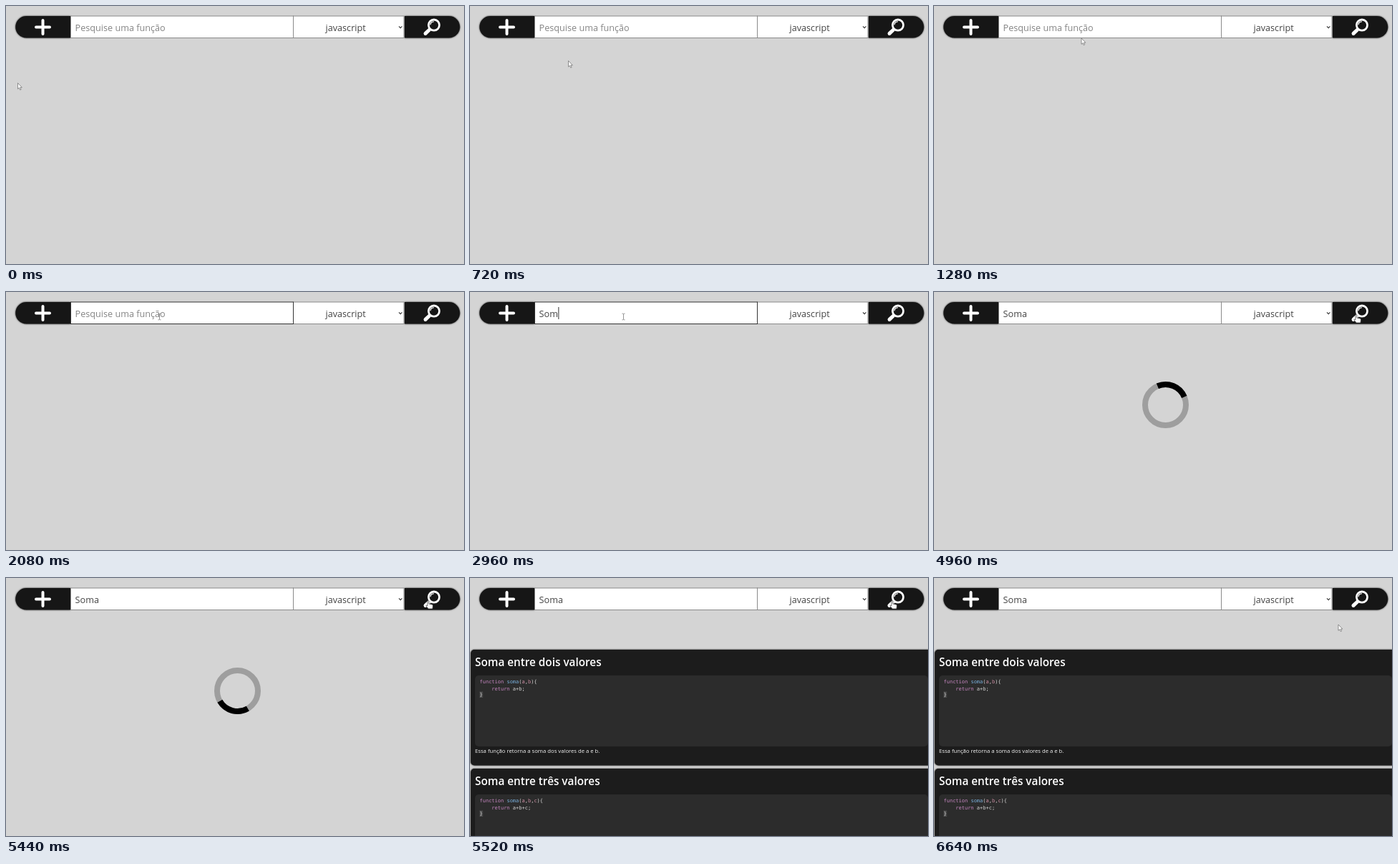
These frames come from a looping animation (640 by 360 pixels, 7.36 s). An HTML page:

```html
<!DOCTYPE html>
<html lang="pt">
<head>
<meta charset="utf-8">
<title>Busca de funções</title>
<style>
  html, body { margin: 0; width: 100%; height: 100%; overflow: hidden; background: #d4d4d4; }
  svg { display: block; width: 100vw; height: 100vh; }
  text { font-family: "Open Sans", "Noto Sans", sans-serif; white-space: pre; }
  .field { font-size: 12.65px; fill: #444; }
  .hint { fill: #858585; }
  .title { font-size: 15.3px; font-weight: 600; fill: #fff; }
  .note { font-size: 7.7px; fill: #f4f4f4; }
  .code { font-family: "DejaVu Sans Mono", monospace; font-size: 7px; fill: #d2d2d2; }
  .key { fill: #c586c0; }
  .name { fill: #79b0dc; }
  .arg { fill: #cf8fa4; }
  .line { fill: none; stroke: #fff; stroke-linecap: round; }
</style>
</head>
<body>
<svg viewBox="0 0 640 360" xmlns="http://www.w3.org/2000/svg">
  <defs>
    <filter id="glow" x="-20%" y="-40%" width="140%" height="180%">
      <feDropShadow dx="0" dy="0" stdDeviation="1.3" flood-color="#000" flood-opacity=".8"/>
    </filter>
  </defs>
  <rect width="640" height="360" fill="#d4d4d4"/>

  <g fill="#191919" filter="url(#glow)">
    <path d="M90 14H28.5a15.3 15.3 0 0 0 0 30.6H90z"/>
    <path d="M557 14h62a15.3 15.3 0 0 1 0 30.6h-62z"/>
  </g>
  <path class="line" d="M51.5 20v19M42 29.5h19" stroke-width="4"/>
  <g class="line">
    <circle cx="598" cy="26.6" r="7.6" stroke-width="2.8"/>
    <path d="M593 26a5 5 0 0 1 4.5 -4.2" stroke-width="1.2"/>
    <path d="M591.5 33.2l-5.4 5.2" stroke-width="5"/>
  </g>
  <rect x="401.5" y="14" width="154.5" height="30.5" fill="#fff" stroke="#8a8a8a"/>
  <rect id="input" x="90.5" y="14" width="311" height="30.5" fill="#fff"/>
  <text class="field" x="446.5" y="34.5">javascript</text>
  <path d="M549 28.4l2.2 2.2 2.2 -2.2" fill="none" stroke="#333" stroke-width="1.1"/>
  <text id="query" x="96.6" y="34.5"></text>
  <rect id="caret" y="21" width="1" height="17" fill="#333"/>

  <g id="spinner" fill="none" stroke-width="8">
    <circle cx="323.5" cy="157.5" r="28.5" stroke="#9e9e9e"/>
    <circle id="arc" cx="323.5" cy="157.5" r="28.5" stroke="#000" stroke-dasharray="44.77 134.3"/>
  </g>
  <g id="results"></g>

  <g id="cursor">
    <path id="arrow" d="M0 0V8.3L1.9 6.6 3.2 9.6 4.6 9 3.3 6.1H5.8z"
      fill="#fff" stroke="#666" stroke-width=".7" stroke-linejoin="round"/>
    <path id="beam" d="M-2 -4.3h1.4l.6 .5 .6 -.5H2M0 -3.8V3.8M-2 4.3h1.4l.6 -.5 .6 .5H2"
      fill="none" stroke="#888" stroke-width=".9"/>
    <path id="hand" d="M-1 1a1 1 0 0 1 2 0V4.5l4.4 1q1.4 .4 1.2 1.9L6 11.5H.2L-3.2 7.4q.3 -1.4 2.2 -.2z"
      fill="#fff" stroke="#333" stroke-width=".7" stroke-linejoin="round"/>
  </g>
</svg>
<script>
const LOOP = 7360, STEP = 80;
const $ = id => document.getElementById(id);
const show = (id, on) => $(id).setAttribute('display', on ? 'inline' : 'none');

// time, x, y of the pointer
const path = [
  [560, 16.5, 107.5], [640, 45, 98], [800, 230, 55], [960, 450, 24], [1040, 495, 20],
  [1120, 420, 27], [1200, 300, 39], [1280, 206, 45], [1360, 209, 41], [1520, 214.5, 34.5],
  [3680, 214.5, 34.5], [3760, 225, 36], [3920, 310, 62], [4080, 430, 85], [4160, 475, 87],
  [4320, 550, 72], [4480, 588, 53], [4640, 590, 41], [4800, 590, 31.5],
  [6080, 590, 31.5], [6240, 587, 38], [6400, 578, 52], [6560, 567, 63], [6640, 565, 65]
];
const typing = [[2640, 'S'], [2800, 'So'], [2960, 'Som'], [3280, 'Soma']];
const caretOn = [[1600, 1920], [2320, 3840], [4400, 4960]];

function pointAt(t) {
  const i = path.findIndex(p => p[0] > t);
  if (i === 0) return path[0].slice(1);
  if (i < 0) return path[path.length - 1].slice(1);
  const [a, ax, ay] = path[i - 1], [b, bx, by] = path[i];
  const k = (t - a) / (b - a);
  return [ax + (bx - ax) * k, ay + (by - ay) * k];
}

function pointerKind(x, y) {
  if (y < 14 || y > 44.5) return 'arrow';
  if (x < 90 || x > 556) return 'hand';
  return x < 401 ? 'beam' : 'arrow';
}

function card(y, height, word, args) {
  const span = (cls, s) => `<tspan class="${cls}">${s}</tspan>`;
  const params = args.map(a => span('arg', a)).join(',');
  return `<rect x="1" y="${y}" width="660" height="${height}" rx="5" fill="#1a1a1a" filter="url(#glow)"/>
    <rect x="7" y="${y + 36}" width="633" height="99" rx="5" fill="#2c2c2c"/>
    <rect x="13.3" y="${y + 58.5}" width="4.8" height="8.5" fill="#484848"/>
    <text class="title" x="7" y="${y + 22.7}">Soma entre ${word} valores</text>
    <text class="code" x="13.5" y="${y + 47.3}">${span('key', 'function')} ${span('name', 'soma')}(${params}){</text>
    <text class="code" x="30.3" y="${y + 56.5}">${span('key', 'return')} ${args.join('+')};</text>
    <text class="code" x="13.5" y="${y + 65.4}">}</text>
    <text class="note" x="7" y="${y + 144}">Essa função retorna a soma dos valores de ${args.join(' e ')}.</text>`;
}
$('results').innerHTML = card(100, 161.5, 'dois', ['a', 'b']) + card(266, 162, 'três', ['a', 'b', 'c']);

function draw(now) {
  const t = Math.floor((now % LOOP) / STEP) * STEP;

  const [x, y] = pointAt(t), kind = pointerKind(x, y);
  $('cursor').setAttribute('transform', `translate(${x} ${y})`);
  for (const id of ['arrow', 'beam', 'hand']) show(id, id === kind);

  const typed = typing.filter(s => s[0] <= t).pop();
  const query = $('query');
  query.textContent = typed ? typed[1] : 'Pesquise uma função';
  query.setAttribute('class', typed ? 'field' : 'field hint');
  $('caret').setAttribute('x', typed ? 97 + query.getComputedTextLength() : 96.5);
  show('caret', caretOn.some(([a, b]) => t >= a && t < b));
  $('input').setAttribute('stroke', t >= 1600 && t < 4960 ? '#333' : '#8a8a8a');

  show('spinner', t >= 4960 && t < 5520);
  $('arc').setAttribute('transform', `rotate(${(t - 4960) * 0.36 - 113} 323.5 157.5)`);
  show('results', t >= 5520);
}

const start = performance.now();
function tick() {
  draw(performance.now() - start);
  requestAnimationFrame(tick);
}
tick();
</script>
</body>
</html>
```
